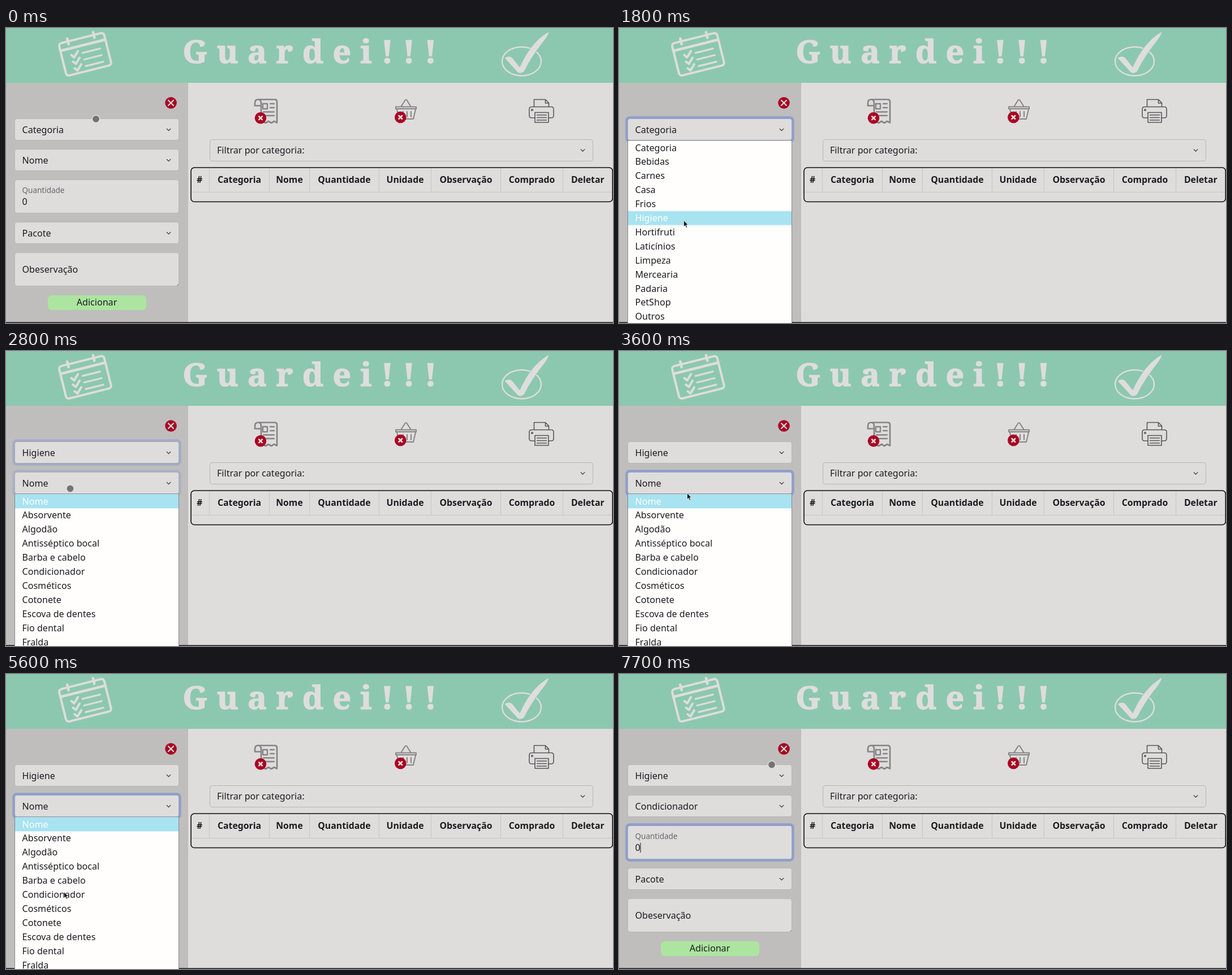
Write an HTML page that moves like this. It is 1073 by 522 pixels and loops after 8 s.

```html
<!DOCTYPE html>
<html lang="pt">
<head>
<meta charset="utf-8">
<title>Lista de compras</title>
<style>
html, body { margin: 0; width: 100%; height: 100%; overflow: hidden; background: #dedddc; }
svg { display: block; width: 100vw; height: 100vh; }
text { font: 16.1px "Noto Sans", "Open Sans", sans-serif; fill: #1b1b20; }
.title { font: 900 57px "Noto Serif", "DejaVu Serif", serif; letter-spacing: 16.5px; fill: #dedddc; stroke: #dedddc; stroke-width: 1.4; }
.label { font-size: 13.5px; fill: #66666a; }
.head text { font-size: 15.8px; font-weight: 700; text-anchor: middle; }
.mid { text-anchor: middle; }
.line { fill: none; stroke-linecap: round; stroke-linejoin: round; }
.box { fill: #dedddc; stroke: #b7b6b5; }
.ring { fill: none; stroke: #8f9fcb; stroke-width: 4.4; }

/* one loop; 1.25% is 100 ms */
.a { animation: 8s step-end -10ms infinite; }
#cursor { animation-name: move; }
#disc { animation-name: disc; }
#arrow { animation-name: arrow; }
#ring1 { animation-name: ring1; }
#ring2 { animation-name: ring2; }
#ring3 { animation-name: ring3; }
#caret { animation-name: caret; }
#menu1 { animation-name: menu1; }
#menu2 { animation-name: menu2; }
#cat0 { animation-name: before1; }
#cat1 { animation-name: after1; }
#name0 { animation-name: before2; }
#name1 { animation-name: after2; }
.bar { animation-name: bar; }
.row0 { animation-name: row0; }
.row5 { animation-name: row5; }

@keyframes move {
  0% { transform: translate(159px, 161px); }
  1.25% { transform: translate(160px, 166px); }
  2.5% { transform: translate(160px, 166px); animation-timing-function: steps(2); }
  5% { transform: translate(162px, 180px); }
  10% { transform: translate(162px, 180px); animation-timing-function: steps(6); }
  17.5% { transform: translate(119px, 315px); }
  20% { transform: translate(114px, 340px); }
  22.5% { transform: translate(114px, 340px); animation-timing-function: steps(6); }
  30% { transform: translate(115px, 244.5px); }
  32.5% { transform: translate(113.5px, 243.5px); }
  41.25% { transform: translate(113.5px, 243.5px); animation-timing-function: steps(3); }
  45% { transform: translate(120px, 251px); animation-timing-function: steps(4); }
  50% { transform: translate(105px, 312px); }
  52.5% { transform: translate(104px, 313px); }
  53.75% { transform: translate(104px, 313px); animation-timing-function: steps(7); }
  62.5% { transform: translate(108px, 361px); }
  66.25% { transform: translate(108px, 361px); animation-timing-function: steps(3); }
  70% { transform: translate(102px, 385px); animation-timing-function: steps(4); }
  75% { transform: translate(106px, 390px); }
  78.75% { transform: translate(106px, 390px); animation-timing-function: steps(2); }
  81.25% { transform: translate(107px, 384px); }
  82.5% { transform: translate(107px, 384px); animation-timing-function: steps(3); }
  86.25% { transform: translate(103px, 353.5px); }
  88.75% { transform: translate(103px, 312px); }
  93.75% { transform: translate(103px, 313.5px); }
  96.25%, 100% { transform: translate(270px, 160.5px); }
}
@keyframes disc { 0%, 28.75%, 85%, 100% { opacity: 1; } 11.25%, 42.5% { opacity: 0; } }
@keyframes arrow { 0%, 28.75%, 85%, 100% { opacity: 0; } 11.25%, 42.5% { opacity: 1; } }
@keyframes ring1 { 0% { opacity: 0; } 7.5% { opacity: .6; } 8.75% { opacity: 1; } 35% { opacity: .6; } 36.25% { opacity: .2; } 37.5%, 100% { opacity: 0; } }
@keyframes ring2 { 0% { opacity: 0; } 35% { opacity: .4; } 36.25% { opacity: .8; } 37.5% { opacity: 1; } 91.25% { opacity: .6; } 92.5% { opacity: .2; } 93.75%, 100% { opacity: 0; } }
@keyframes ring3 { 0% { opacity: 0; } 91.25% { opacity: .4; } 92.5% { opacity: .8; } 93.75%, 100% { opacity: 1; } }
@keyframes caret { 0% { opacity: 0; } 91.25%, 100% { opacity: 1; } }
@keyframes menu1 { 0% { opacity: 0; } 7.5% { opacity: 1; } 23.75%, 100% { opacity: 0; } }
@keyframes menu2 { 0% { opacity: 0; } 35% { opacity: 1; } 78.75%, 100% { opacity: 0; } }
@keyframes before1 { 0% { opacity: 1; } 23.75%, 100% { opacity: 0; } }
@keyframes after1 { 0% { opacity: 0; } 23.75%, 100% { opacity: 1; } }
@keyframes before2 { 0% { opacity: 1; } 78.75%, 100% { opacity: 0; } }
@keyframes after2 { 0% { opacity: 0; } 78.75%, 100% { opacity: 1; } }
@keyframes bar { 0%, 30% { transform: none; } 22.5%, 77.5%, 100% { transform: translateY(124.5px); } }
@keyframes row0 { 0%, 30% { fill: #fff; } 22.5%, 77.5%, 100% { fill: #1b1b20; } }
@keyframes row5 { 0%, 30% { fill: #1b1b20; } 22.5%, 77.5%, 100% { fill: #fff; } }
</style>
</head>
<body>
<svg viewBox="0 0 1073 522">
  <defs>
    <path id="chevron" class="line" d="M-3.3-1.6L0 1.7 3.3-1.6" stroke="#29292d" stroke-width="1.2"/>
    <circle id="dot" r="10.3" fill="#aa0422"/>
    <g id="badge">
      <use href="#dot"/>
      <path class="line" d="M-2.8-2.8L2.8 2.8M2.8-2.8L-2.8 2.8" stroke="#dedddc" stroke-width="2.7"/>
    </g>
  </defs>

  <rect width="1073" height="522" fill="#dedddc"/>
  <rect width="322" height="522" y="97" fill="#bfbebd"/>
  <rect width="1073" height="97" fill="#8cc8af"/>

  <!-- banner -->
  <text class="title mid" x="545" y="62">Guardei!!!</text>
  <g class="line" transform="translate(140 47) rotate(-14)" stroke="#dedddc" stroke-width="4">
    <rect x="-41" y="-30" width="82" height="59" rx="5"/>
    <path d="M-40-17H40M-24-35v10M23-35v10" stroke-width="4.6"/>
    <path d="M-24-5l4 5 9-9M-24 7l4 5 9-9M-24 19l4 5 9-9"/>
    <path d="M-4-4H28M-4 8H28M-4 20H28" stroke-width="3.2"/>
  </g>
  <ellipse cx="911.5" cy="59" rx="34.5" ry="25.5" fill="none" stroke="#dedddc" stroke-width="2.4"/>
  <path d="M881 53Q891 46 897 55L908 69Q928 24 960 6Q959 13 951 23Q930 49 916 77Q909 83 904 78Z" fill="#dedddc" stroke="#8cc8af"/>

  <!-- toolbar -->
  <g class="line" stroke="#858486" stroke-width="2.7">
    <path d="M445 126.5h30q4 0 4 4v37l-5-2.5-5 3-5-3-5 3-8-4V133q0-6.5-5.5-6.5t-5.500 6v5h10"/>
    <path d="M454 134h8v9h-8zM467 134h7M467 141h7M455 148.5h19M460 155h14" stroke-width="2.3"/>
    <path d="M689 139.5h36v3.500h-36zM691 144l4 17h25l4-17M699 138l7-11M715 138l-7-11M702 148v9M709 148v9M716 148v9" stroke-width="2"/>
  </g>
  <g class="line" stroke="#58575a" stroke-width="1.6">
    <path d="M933.5 139v-12.500h20l6 6v6.500M953.5 127v6h6"/>
    <path d="M935 159h-6q-4 0-4-4v-11.500q0-4 4-4h35q4 0 4 4V155q0 4-4 4h-5"/>
    <path d="M935 149.5h24v17.500h-24zM938.5 154h17M938.5 158.5h17M938.5 163h17"/>
    <circle cx="930" cy="145" r="1.3"/>
  </g>
  <use href="#dot" x="291.5" y="132.5"/>
  <path class="line" d="M287 128l9 9M296 128l-9 9" stroke="#dedddc" stroke-width="2.2"/>
  <use href="#badge" x="450" y="159.3"/>
  <use href="#badge" x="697.3" y="158"/>

  <rect class="box" x="360.5" y="197.5" width="677" height="38" rx="4"/>
  <text x="373" y="222">Filtrar por categoria:</text>
  <use href="#chevron" x="1019.5" y="216.5"/>

  <!-- table -->
  <g class="head" id="head">
    <path d="M327 290.5H1072" stroke="#c6c5c4"/>
    <rect x="327" y="247" width="745.3" height="60.5" rx="6" fill="none" stroke="#0d0d0f" stroke-width="1.6"/>
  </g>

  <!-- form -->
  <g id="form"></g>
  <text id="cat0" class="a" x="28.5" y="185.5">Categoria</text>
  <text id="cat1" class="a" x="28.5" y="185.5">Higiene</text>
  <text id="name0" class="a" x="28.5" y="239.5">Nome</text>
  <text id="name1" class="a" x="28.5" y="239.5">Condicionador</text>
  <text class="label" x="28.5" y="291.5">Quantidade</text>
  <text x="28.5" y="312.5">0</text>
  <path id="caret" class="a" d="M38 298.5v17.5" stroke="#111"/>
  <text x="28.5" y="368.5">Pacote</text>
  <text x="28.5" y="432.5">Obeservação</text>
  <path d="M302 456l3-3" stroke="#77767a"/>
  <rect x="74" y="473" width="174" height="26" rx="7" fill="#ace5a0"/>
  <text class="mid" x="160.5" y="491.3">Adicionar</text>

  <rect y="520.3" width="1073" height="2" fill="#2c2730"/>
  <g id="menu1" class="a"></g>
  <g id="menu2" class="a"></g>

  <g id="cursor" class="a">
    <circle id="disc" class="a" r="6.6" fill="#747374" stroke="#eeedec" stroke-width="1.2"/>
    <path id="arrow" class="a" d="M.5.5v11l2.500-2.300 1.900 4 1.800-.8-1.900-3.900h3.200z" fill="#151517" stroke="#f4f4f4" stroke-width=".7"/>
  </g>
</svg>
<script>
const $ = id => document.getElementById(id);
const add = (id, html) => $(id).insertAdjacentHTML('beforeend', html);

// form fields: top, height, has chevron
[[161, 38, 1], [215, 38, 1], [269, 59, 0], [344, 38, 1], [398, 59, 0]].forEach(([y, h, select], i) => {
  add('form', `<rect class="box" x="15.5" y="${y - .5}" width="290" height="${h}" rx="4"/>`);
  if (i < 3) add('form', `<rect id="ring${i + 1}" class="ring a" x="13.5" y="${y - 2.5}" width="294" height="${h + 4}" rx="5"/>`);
  if (select) add('form', `<use href="#chevron" x="287.5" y="${y + 19}"/>`);
});

const edges = [327, 359.5, 465.5, 536.5, 659.5, 751.5, 874.5, 984.5, 1072];
['#', 'Categoria', 'Nome', 'Quantidade', 'Unidade', 'Observação', 'Comprado', 'Deletar'].forEach((name, i) => {
  const [l, r] = [edges[i], edges[i + 1]];
  add('head', `<text x="${i ? (l + r) / 2 : 342}" y="274.3">${name}</text>`);
  if (i) add('head', `<path d="M${l} 248V290" stroke="#c6c5c4"/>`);
});

const step = 24.9;
function menu(id, top, items) {
  add(id, `<rect x="15.5" y="${top}" width="290" height="400" fill="#fffefd" stroke="#85858a"/>
    <rect class="a bar" x="16" y="${top + .5}" width="289" height="${step}" fill="#a8e3f1"/>`);
  items.split(',').forEach((name, i) => {
    const cls = i === 0 || i === 5 ? `class="a row${i}"` : '';
    add(id, `<text ${cls} x="28.5" y="${top + 18.5 + i * step}">${name}</text>`);
  });
}
menu('menu1', 199, 'Categoria,Bebidas,Carnes,Casa,Frios,Higiene,Hortifruti,Laticínios,Limpeza,Mercearia,Padaria,PetShop,Outros');
menu('menu2', 253, 'Nome,Absorvente,Algodão,Antisséptico bocal,Barba e cabelo,Condicionador,Cosméticos,Cotonete,Escova de dentes,Fio dental,Fralda');
</script>
</body>
</html>
```
